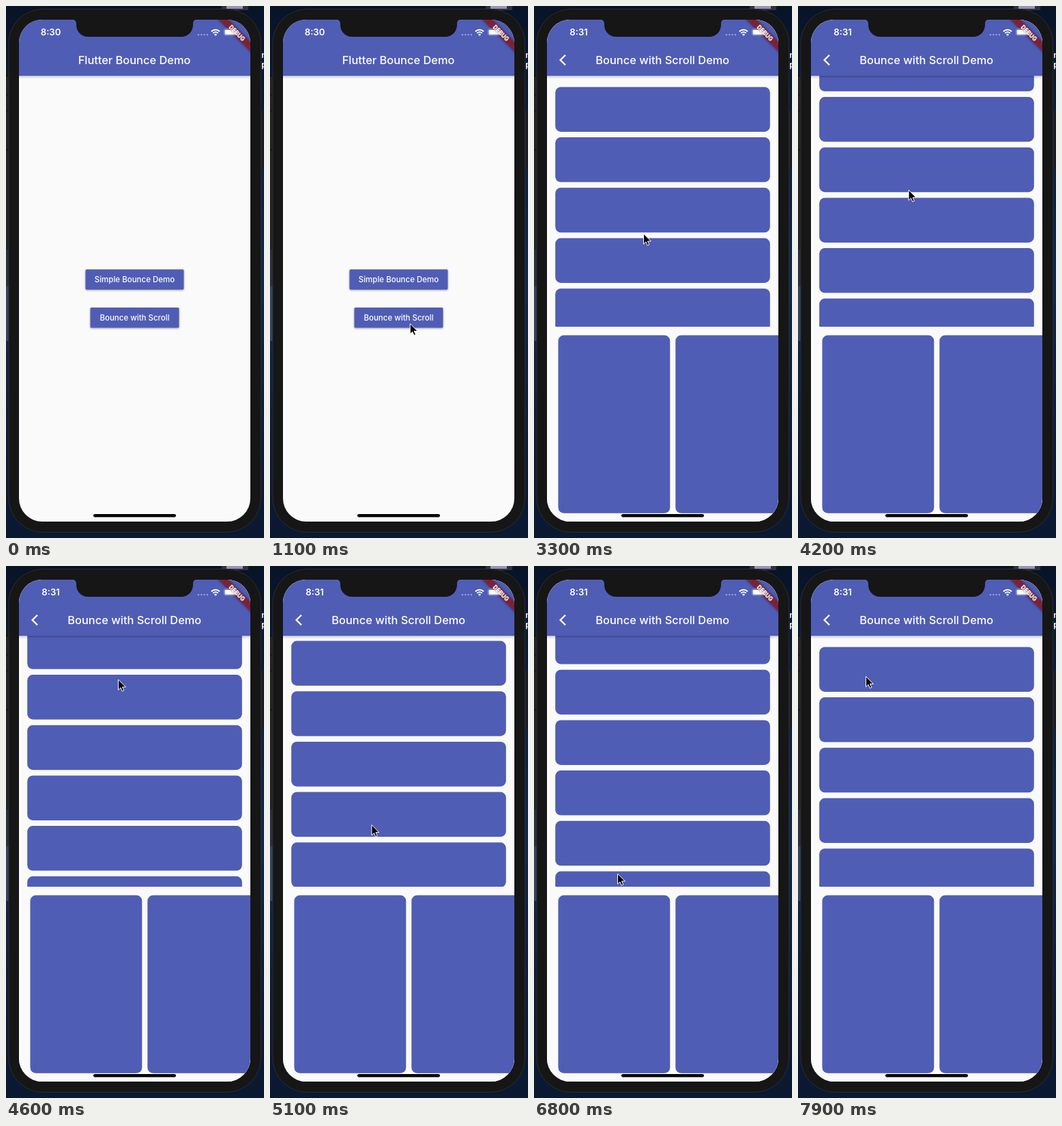
Animation, 378 px wide and 778 px high, one loop 8000 ms. Source, as an HTML page:

```html
<!DOCTYPE html>
<html lang="en">
<head>
<meta charset="utf-8">
<title>Bounce demo</title>
<style>
  html, body { margin: 0; width: 100%; height: 100%; overflow: hidden; background: #0a1830; }
  svg { display: block; width: 378px; height: 778px; font-family: Inter, Roboto, sans-serif; }
  text { fill: #fff; text-anchor: middle; }
  .title { font-size: 16.4px; font-weight: 500; }
  .label { font-size: 11.5px; font-weight: 500; }
  .clock { font-size: 13.2px; font-weight: 600; }
  .indigo { fill: #505db5; }
  .paper { fill: #fafafa; }
  .raised { filter: drop-shadow(0 1.6px 1.6px rgba(0, 0, 0, .36)); }
</style>
</head>
<body>
<svg viewBox="0 0 378 778">
  <defs>
    <linearGradient id="sky" x2="0" y2="1">
      <stop offset="0" stop-color="#081326"/>
      <stop offset=".2" stop-color="#0b1d3a"/>
      <stop offset=".5" stop-color="#11294e"/>
      <stop offset="1" stop-color="#0a1830"/>
    </linearGradient>
    <linearGradient id="barShade" x2="0" y2="1">
      <stop offset="0" stop-color="#000" stop-opacity=".24"/>
      <stop offset=".4" stop-color="#000" stop-opacity=".09"/>
      <stop offset="1" stop-color="#000" stop-opacity="0"/>
    </linearGradient>
    <linearGradient id="edgeShade">
      <stop offset="0" stop-color="#000" stop-opacity="0"/>
      <stop offset="1" stop-color="#000" stop-opacity=".14"/>
    </linearGradient>
    <clipPath id="screen"><rect x="19" y="20" width="339" height="734" rx="34"/></clipPath>
    <clipPath id="viewport"><rect x="19" y="102" width="339" height="367"/></clipPath>
    <clipPath id="scrollButton"><rect x="123.5" y="441" width="130" height="29.5" rx="1.6"/></clipPath>
    <g id="bar">
      <rect x="19" y="102" width="339" height="5" fill="url(#barShade)"/>
      <rect class="indigo" x="19" y="20" width="339" height="82"/>
    </g>
  </defs>

  <!-- desktop behind the phone -->
  <rect width="378" height="778" fill="url(#sky)"/>
  <rect y="102" width="8" height="254" fill="#222326"/>
  <path d="M0 102.500h8M0 130h8M0 153h8M0 210h8" stroke="#0c0d10"/>
  <rect y="356" width="8" height="54" fill="#27303f"/>
  <rect y="410" width="8" height="80" fill="#31445f"/>
  <rect x="370" y="153" width="8" height="83" fill="#1c1f26"/>
  <rect x="316" width="39" height="6" fill="#34323f"/>
  <rect x="323" width="24" height="4" fill="#9894b8"/>
  <text x="378" y="76" font-size="12" font-weight="600">n</text>
  <text x="378" y="90" font-size="12" font-weight="600">p</text>

  <rect x="4" y="4.500" width="369.500" height="765" rx="50" fill="#161616" stroke="#2b2d31"/>

  <g clip-path="url(#screen)">
    <rect class="paper" x="19" y="20" width="339" height="734"/>
    <g id="home">
      <use href="#bar"/>
      <text class="title" x="188" y="84.700">Flutter Bounce Demo</text>
      <rect class="indigo raised" x="116.500" y="385.200" width="144" height="29.500" rx="1.6"/>
      <rect class="indigo raised" x="123.500" y="441" width="130" height="29.500" rx="1.6"/>
      <g clip-path="url(#scrollButton)"><circle id="ripple" cx="196" cy="457" fill="#fff"/></g>
      <text class="label" x="188.500" y="404">Simple Bounce Demo</text>
      <text class="label" x="188.500" y="459.800">Bounce with Scroll</text>
    </g>

    <g id="page">
      <rect x="4" y="20" width="15" height="734" fill="url(#edgeShade)"/>
      <rect class="paper" x="19" y="20" width="339" height="734"/>
      <g clip-path="url(#viewport)"><g id="list"></g></g>
      <rect class="indigo" x="35.500" y="481.500" width="163.800" height="260.200" rx="8.200"/>
      <rect class="indigo" x="207.300" y="481.500" width="163.800" height="260.200" rx="8.200"/>
      <use href="#bar"/>
      <path d="M46 71.700 38.600 79 46 86.300" fill="none" stroke="#fff" stroke-width="2.300"/>
      <text class="title" x="188.300" y="84.700">Bounce with Scroll Demo</text>
    </g>

    <!-- debug ribbon -->
    <g transform="translate(358 20) rotate(45)">
      <rect x="-40" y="22.900" width="80" height="9.800" fill="#7d2138" style="filter:drop-shadow(0 0 2px rgba(0,0,0,.45))"/>
    </g>

    <!-- status bar -->
    <text id="clock" class="clock" x="65.600" y="43.300">8:30</text>
    <g fill="#fff" opacity=".4">
      <circle cx="282" cy="42" r="1.300"/><circle cx="286.300" cy="42" r="1.300"/>
      <circle cx="290.600" cy="42" r="1.300"/><circle cx="294.900" cy="42" r="1.300"/>
    </g>
    <g fill="none" stroke="#fff" stroke-width="1.900">
      <path d="M300.900 37.200a8.700 8.700 0 0 1 12.200 0"/>
      <path d="M303.200 39.700a5.400 5.400 0 0 1 7.600 0"/>
    </g>
    <path d="M307 43.800l-2.200-2.300a3.100 3.100 0 0 1 4.400 0z" fill="#fff"/>
    <rect x="319.500" y="33.500" width="19" height="9.400" rx="2.600" fill="none" stroke="#fff" stroke-opacity=".45" stroke-width=".8"/>
    <rect x="320.700" y="34.700" width="16.600" height="7" rx="1.500" fill="#fff"/>
    <path d="M339.600 36.700v3a1.600 1.600 0 0 0 0-3z" fill="#fff" opacity=".5"/>
    <text transform="translate(358 20) rotate(45)" y="30.900" font-size="8.300" font-weight="900"
      style="filter:drop-shadow(0 0 .8px rgba(60,10,25,.8))">DEBUG</text>

    <path d="M97 19.500Q103 20 103 26v2a17 17 0 0 0 17 17h137a17 17 0 0 0 17-17v-2q0-6 6-6.500z" fill="#161616"/>
    <rect x="128" y="743" width="121" height="4.400" rx="2.200"/>
  </g>

  <path id="cursor" d="M0 0v15.200l3.500-3.300 2.300 5.200 2.500-1.100-2.300-5h4.900z"
    fill="#000" stroke="#fff" stroke-width="1" stroke-linejoin="round"/>
</svg>

<script>
const LOOP = 8000, STEP = 100;
const ROWS = 10, PITCH = 73.7;
const WIDTH = 339;

// Each track is a list of [ms, value].
const push = [[1700, 0], [1800, .463], [1900, .76], [2000, .9], [2100, .96], [2200, .988], [2350, 1]];
const scroll = [
  [3900, 0], [4600, 180.5], [5000, 228], [5100, 230], [5650, 402], [5800, 414.4],
  [6150, 386.4], [6250, 386.4], [6800, 114.1], [7000, 25], [7150, -18], [7450, 0]
];
const cursorX = [
  [0, 390], [700, 215], [900, 215], [1300, 195.5], [2300, 195.5], [3300, 160.5], [3900, 160.5],
  [4600, 164.5], [5050, 150], [5800, 138.5], [6200, 138.5], [6800, 122.5], [7400, 112], [7900, 99.5]
];
const cursorY = [
  [0, 585], [700, 472], [900, 472], [1300, 457], [2300, 457], [3300, 333], [3900, 336],
  [4600, 166], [5050, 382], [5700, 174], [5800, 172.5], [6200, 180], [6800, 450], [7000, 452],
  [7400, 410], [7900, 161.5]
];

// Smooth curve through the points that never overshoots them.
function sample(track, t) {
  const last = track.length - 1;
  if (t <= track[0][0]) return track[0][1];
  if (t >= track[last][0]) return track[last][1];
  const slope = i => (track[i + 1][1] - track[i][1]) / (track[i + 1][0] - track[i][0]);
  const tangent = i => {
    if (i === 0 || i === last) return 0;
    const a = slope(i - 1), b = slope(i);
    return a * b > 0 ? 2 * a * b / (a + b) : 0;
  };
  const i = track.findIndex(p => p[0] > t) - 1;
  const [t0, v0] = track[i], [t1, v1] = track[i + 1];
  const d = t1 - t0, u = (t - t0) / d, w = 1 - u;
  return w * w * ((1 + 2 * u) * v0 + u * d * tangent(i))
       + u * u * ((1 + 2 * w) * v1 - w * d * tangent(i + 1));
}

const el = id => document.getElementById(id);
const [home, page, list, ripple, clock, cursor] =
  ["home", "page", "list", "ripple", "clock", "cursor"].map(el);
const move = (node, x, y) => node.setAttribute("transform", `translate(${x} ${y})`);

for (let i = 0; i < ROWS; i++) {
  const row = document.createElementNS("http://www.w3.org/2000/svg", "rect");
  const attrs = { class: "indigo", x: 31.2, y: 118.4 + i * PITCH, width: 314.6, height: 65.5, rx: 8.2 };
  for (const key in attrs) row.setAttribute(key, attrs[key]);
  list.append(row);
}

function draw(time) {
  const t = Math.floor(time / STEP) * STEP;
  const p = sample(push, t);
  move(home, -p * WIDTH / 3, 0);
  move(page, (1 - p) * WIDTH, 0);
  page.style.display = p > 0 ? "" : "none";
  move(list, 0, -sample(scroll, t));
  ripple.setAttribute("r", t > 1700 ? 44 + (t - 1800) * .2 : 0);
  ripple.setAttribute("opacity", Math.max(0, .08 - Math.max(0, t - 1800) * .0003));
  clock.textContent = t < 2700 ? "8:30" : "8:31";
  move(cursor, sample(cursorX, t), sample(cursorY, t));
}

const start = performance.now();
function tick() {
  draw((performance.now() - start) % LOOP);
  requestAnimationFrame(tick);
}
tick();
</script>
</body>
</html>
```
